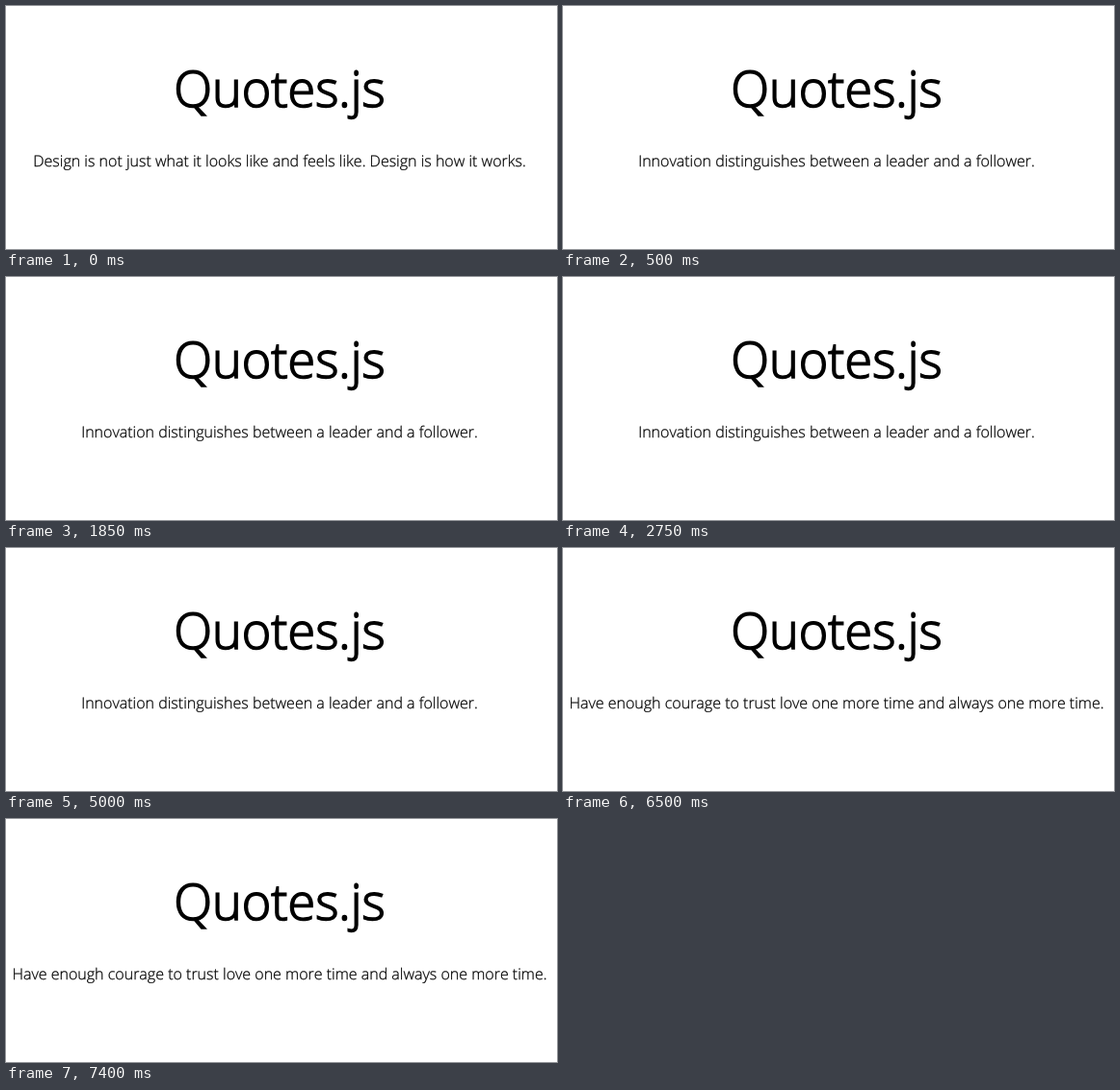
Recreate the animation shown at these times as an HTML page. Size 572x253 px, loop 8000 ms.

```html
<!DOCTYPE html>
<html lang="en">
<head>
<meta charset="utf-8">
<title>Quotes.js</title>
<style>
  html, body { margin: 0; width: 100%; height: 100%; overflow: hidden; background: #fff; }
  svg { display: block; }
  text {
    font-family: "Open Sans", sans-serif;
    font-weight: 300;
    font-kerning: none;
    text-anchor: middle;
    text-rendering: geometricPrecision;
    stroke: #000;
  }
  .title { font-size: 52px; stroke-width: 1.6px; }
  .quote { font-size: 16px; stroke-width: 0.25px; }
</style>
</head>
<body>
<svg width="572" height="253" viewBox="0 0 572 253">
  <text class="title" x="284" y="105">Quotes.js</text>
  <text class="quote" x="284" y="167"></text>
</svg>
<script>
  const LOOP = 8000;
  const quotes = [
    { start: 0, text: "Design is not just what it looks like and feels like. Design is how it works." },
    { start: 500, text: "Innovation distinguishes between a leader and a follower." },
    { start: 6500, text: "Have enough courage to trust love one more time and always one more time." },
  ];
  const line = document.querySelector(".quote");

  function draw() {
    const time = performance.now() % LOOP;
    const { text } = quotes.findLast(quote => time >= quote.start);
    if (line.textContent !== text) line.textContent = text;
    requestAnimationFrame(draw);
  }
  draw();
</script>
</body>
</html>
```
